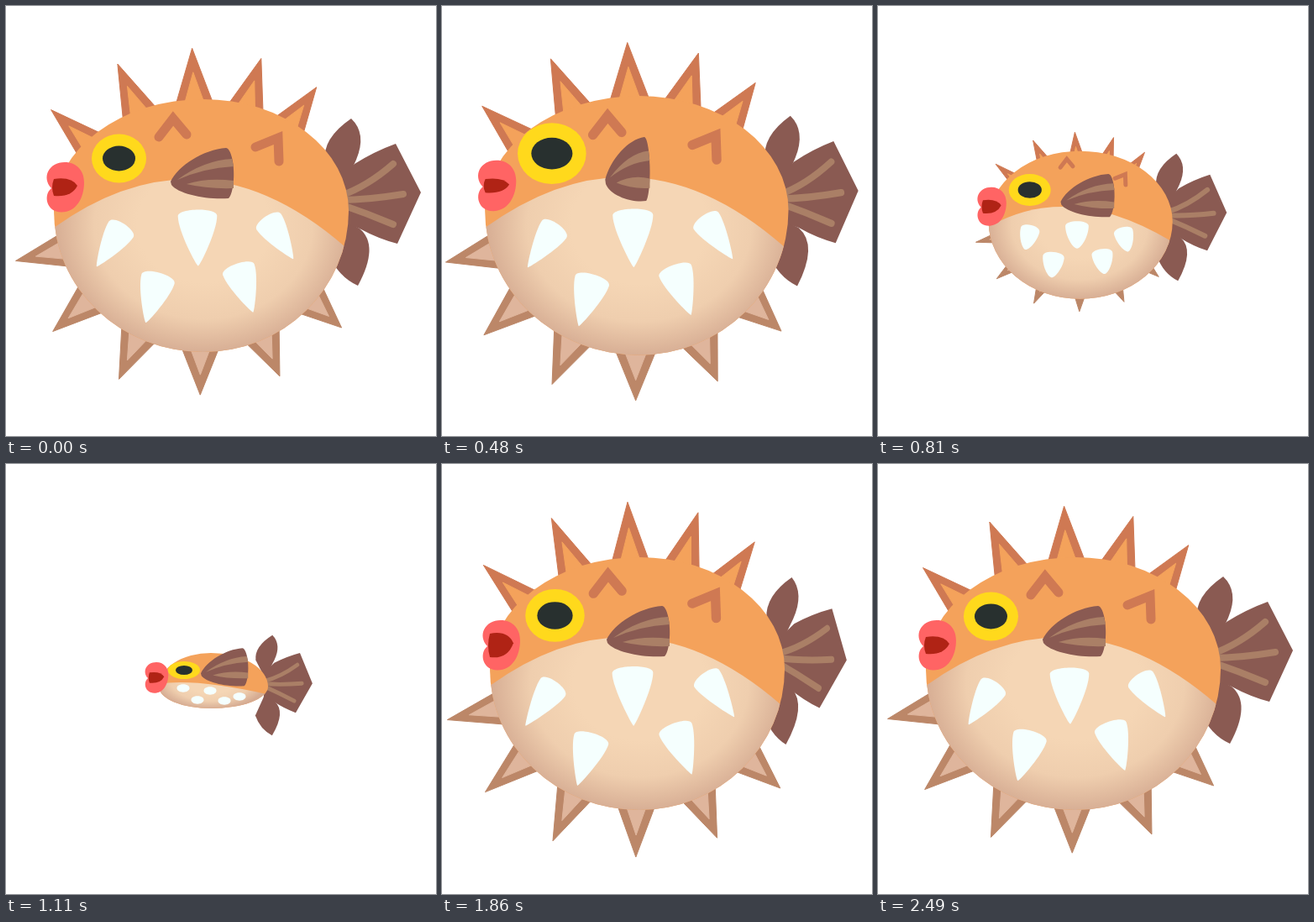
Write an HTML page with a canvas that moves like this. It is 512 by 512 pixels and loops after 2520 ms.

```html
<!DOCTYPE html>
<html lang="en">
<head>
<meta charset="utf-8">
<title>Blowfish</title>
<style>
html, body { margin: 0; width: 100%; height: 100%; overflow: hidden; background: #fff; }
canvas { display: block; width: 512px; height: 512px; }
</style>
</head>
<body>
<canvas id="stage" width="512" height="512"></canvas>
<script>
const ctx = document.getElementById('stage').getContext('2d');
const LOOP = 2520, STEP = 30, DEG = Math.PI / 180;
const ORANGE = '#f4a25b', BROWN = '#8a5a52', RAY = '#aa7f66', RUST = '#cf7953';
const lerp = (a, b, k) => a + (b - a) * k;
const path = d => new Path2D(d);

// How inflated the fish is: 0 slim, 1 round
const puffKeys = [[0, 1], [400, 1.07], [540, 1.01], [660, .805], [1020, 0],
                  [1680, .005], [1860, 1], [1950, 1.045], [2520, 1]];

// Monotone cubic interpolation, flat at turning points
function ease(keys, t) {
  const rate = i => (keys[i + 1][1] - keys[i][1]) / (keys[i + 1][0] - keys[i][0]);
  const slope = i => {
    if (i === 0 || i === keys.length - 1) return 0;
    const a = rate(i - 1), b = rate(i);
    return a * b > 0 ? 2 * a * b / (a + b) : 0;
  };
  let i = 0;
  while (i < keys.length - 2 && t >= keys[i + 1][0]) i++;
  const [t0, v0] = keys[i], [t1, v1] = keys[i + 1];
  const h = t1 - t0, u = (t - t0) / h, w = 1 - u;
  return v0 * (1 + 2 * u) * w * w + slope(i) * h * u * w * w
       + v1 * u * u * (3 - 2 * u) - slope(i + 1) * h * u * u * w;
}

// Smooth pulse of height 1 around a moment
function bump(t, mid, width) {
  const d = Math.abs(t - mid) / width;
  return d < 1 ? Math.cos(d * Math.PI / 2) ** 2 : 0;
}

function pose(t) {
  const puff = ease(puffKeys, t);
  const swim = (1 - puff) * Math.sin((t - 1110) * Math.PI / 380) ** 2;
  const burst = bump(t, 1860, 250);
  const extra = .085 * bump(t, 1940, 270);
  const height = puff + .2 * puff * (1 - puff);
  return {
    puff, swim, height,
    teeth: puff + extra,
    reach: height + .4 * extra,
    eye: 1 + .24 * bump(t, 440, 300) + .24 * swim + .09 * bump(t, 1900, 250),
    flap: bump(t, 480, 330),
    tailTurn: lerp(5, 0, puff) + 8 * burst,
    tailWide: 1 - .12 * bump(t, 630, 260) - .14 * burst,
    gape: .4 * burst - .2 * bump(t, 480, 180)
  };
}

function fill(shape, color) { ctx.fillStyle = color; ctx.fill(shape); }
function stroke(shape, color, width) {
  ctx.strokeStyle = color;
  ctx.lineWidth = width;
  ctx.stroke(shape);
}
function oval(x, y, rx, ry, color) {
  const p = path();
  p.ellipse(x, y, rx, ry, 0, 0, 7);
  fill(p, color);
}
function triangle(a, b, c, color) {
  const p = path(`M${a}L${b}L${c}Z`);
  fill(p, color);
  stroke(p, color, 1);
}

// Moves a part drawn for the round fish to its place and size at k
function part(round, slim, scale, k, draw, turn = 0, sx = 1, sy = 1) {
  ctx.save();
  ctx.translate(lerp(slim[0], round[0], k), lerp(slim[1], round[1], k));
  ctx.rotate(turn * DEG);
  ctx.scale(lerp(scale, 1, k) * sx, lerp(scale, 1, k) * sy);
  ctx.translate(-round[0], -round[1]);
  draw();
  ctx.restore();
}

function drawTail(v) {
  const place = (turn, draw) => part([400, 235], [308, 264], .6, v.puff, draw, turn, v.tailWide);
  place(v.tailTurn / 2, () => {
    fill(path('M380 185Q376 158 411 134Q430 152 417 183L400 220Z'), BROWN);
    fill(path('M384 295Q395 322 419 333Q445 285 421 265L400 255Z'), BROWN);
  });
  place(v.tailTurn, () => {
    fill(path('M400 205L415 188Q439 173 464 164L494 222L466 283Q443 277 421 265L400 258Z'), BROWN);
    for (const i of [-1, 0, 1])
      stroke(path(`M398 ${231 + 5 * i}Q430 ${231 + 16 * i} ${473 - 12 * i * i} ${224 + 36 * i}`), RAY, 8);
  });
}

function drawSpikes(v) {
  const spot = (deg, k, rx, ry) => [
    lerp(247, 232, k) + lerp(.2, 1, k) * rx * Math.cos(deg * DEG),
    lerp(258, 262, k) + lerp(.12, 1, k) * ry * Math.sin(deg * DEG)
  ];
  const spike = (deg, size, outer, inner) => {
    const tip = spot(deg, v.reach, 225 * size, 208 * size);
    const [a, b, mid] = [-8, 8, 0].map(d => spot(deg + d, v.puff, 167, 144));
    const toMid = (p, k) => p.map((c, i) => lerp(c, mid[i], k));
    triangle(a, tip, b, outer);
    triangle(toMid(a, .45), toMid(tip, .42), toMid(b, .45), inner);
  };
  for (let i = 0; i < 5; i++) spike(-140 + 25.5 * i - .9 * i * i, 1.035 - .008 * i, RUST, ORANGE);
  for (let i = 0; i < 6; i++) spike(168.5 - 26.1 * i, 1 - .011 * i, '#bc8768', '#dfb59c');
}

function drawBody(v) {
  const p = v.puff, h = v.height, swell = 1 + .1 * v.swim;
  const x = lerp(244, 235, p), y = lerp(265, 244, p);
  const left = lerp(62, 178, p), right = lerp(68, 173, p);
  const up = lerp(40, 133, h) * swell, down = lerp(26, 168, h) * swell;
  const body = path(`M${x - left} ${y}A${left} ${up} 0 0 1 ${x} ${y - up}A${right} ${up} 0 0 1 ${x + right} ${y}` +
    `A${right} ${down} 0 0 1 ${x} ${y + down}A${left} ${down} 0 0 1 ${x - left} ${y}Z`);
  const at = (slim, round) => slim.map((c, i) => lerp(c, round[i], p));
  const belly = path(`M${at([182, 262], [57, 264])}Q${at([224, 255], [233, 138])} ${at([310, 274], [404, 287])}V500H0Z`);
  fill(body, ORANGE);
  ctx.save();
  ctx.clip(body);
  ctx.clip(belly);
  ctx.translate(x, y + (down - up) / 2);
  ctx.scale((left + right) / 2, (up + down) / 2);
  const shade = ctx.createRadialGradient(0, 0, .45, 0, 0, 1.03);
  shade.addColorStop(0, '#f5d6b5');
  shade.addColorStop(.5, '#efceae');
  shade.addColorStop(1, '#d5ab92');
  ctx.fillStyle = shade;
  ctx.fillRect(-2, -2, 4, 4);
  ctx.restore();
}

function drawMarks(v) {
  const mark = (d, round, slim) => part(round, slim, 0, v.reach, () => stroke(path(d), RUST, 11));
  ctx.lineJoin = 'miter';
  mark('M182 156L199 134L215 153', [199, 142], [246, 222]);
  mark('M297 168L324 157L325 185', [320, 165], [270, 236]);
  ctx.lineJoin = 'round';
}

// Each spot on the slim belly grows into a tooth that leans outwards
const teeth = [
  { round: [137, 266], slim: [211, 267] }, { round: [228, 250], slim: [243, 270] },
  { round: [313, 257], slim: [278, 277] }, { round: [181, 325], slim: [228, 281] },
  { round: [277, 314], slim: [260, 282] }
];
function drawTooth({ round, slim }, k) {
  const off = round[0] - 225, far = Math.abs(off);
  const fall = 60 - .18 * far, lean = Math.atan2(-.33 * off, fall);
  const w = lerp(7.5, 23.5 - .07 * far, k), len = lerp(4.7, Math.hypot(fall, .33 * off), k);
  const cap = lerp(-6.2, -10, k), shoulder = len * lerp(.55, .3, k), toe = w * lerp(.55, .09, k);
  ctx.save();
  ctx.translate(lerp(slim[0], round[0], k), lerp(slim[1], round[1], k));
  ctx.rotate(lean * k);
  fill(path(`M${-w} 0C${-w} ${cap} ${w} ${cap} ${w} 0C${w} ${shoulder} ${toe} ${len} 0 ${len}` +
    `C${-toe} ${len} ${-w} ${shoulder} ${-w} 0Z`), '#f5fffe');
  ctx.restore();
}

function drawEye(v) {
  const p = v.puff, wide = 1 + (v.eye - 1) * p;
  const x = lerp(212, 134.5, p), y = lerp(245.5, 181.5, p) - (v.eye - 1) * 13;
  oval(x, y, lerp(19, 32.5, p) * wide, lerp(10.5, 29, p) * v.eye, '#ffd91c');
  oval(x, y, lerp(10, 19.5, p) * wide, lerp(5.5, 15, p) * v.eye, '#28302f');
}

function drawLips(v) {
  const round = [70, 216], slim = [179, 254.5];
  part(round, slim, .62, v.puff, () =>
    fill(path('M70 186C84 186 93 196 93 210C93 228 84 245.5 66 245.5C48 245.5 44 225 54 217C42 204 51 186 70 186Z'), '#ff6464'));
  part(round, slim, .62, v.puff, () =>
    fill(path('M57 206Q78 203 85 214Q78 228 57 226Q53 216 57 206Z'), '#b02315'), 0, 1, 1 + v.gape);
}

function drawFin(v) {
  part([196, 210], [232, 250], .75, v.puff, () => {
    fill(path('M196 209C205 190 235 171 262 169C267 169 271 185 271 195C272 210 269 226 265 229C240 231 205 224 197 213Z'), BROWN);
    fill(path('M204 207Q235 184 269 182L271 191Q235 193 204 207ZM215 212Q240 204 271 208V217Q240 218 215 212Z'), RAY);
  }, 5 * v.swim, 1 - .3 * v.flap, 1 + .25 * v.flap);
}

function draw(t) {
  const v = pose(t);
  ctx.fillStyle = '#fff';
  ctx.fillRect(0, 0, 512, 512);
  ctx.lineJoin = ctx.lineCap = 'round';
  drawTail(v);
  drawSpikes(v);
  drawBody(v);
  drawMarks(v);
  for (const tooth of teeth) drawTooth(tooth, v.teeth);
  drawEye(v);
  drawLips(v);
  drawFin(v);
}

const start = performance.now();
function tick() {
  const t = (performance.now() - start) % LOOP;
  draw(Math.floor(t / STEP) * STEP);
  requestAnimationFrame(tick);
}
tick();
</script>
</body>
</html>
```
